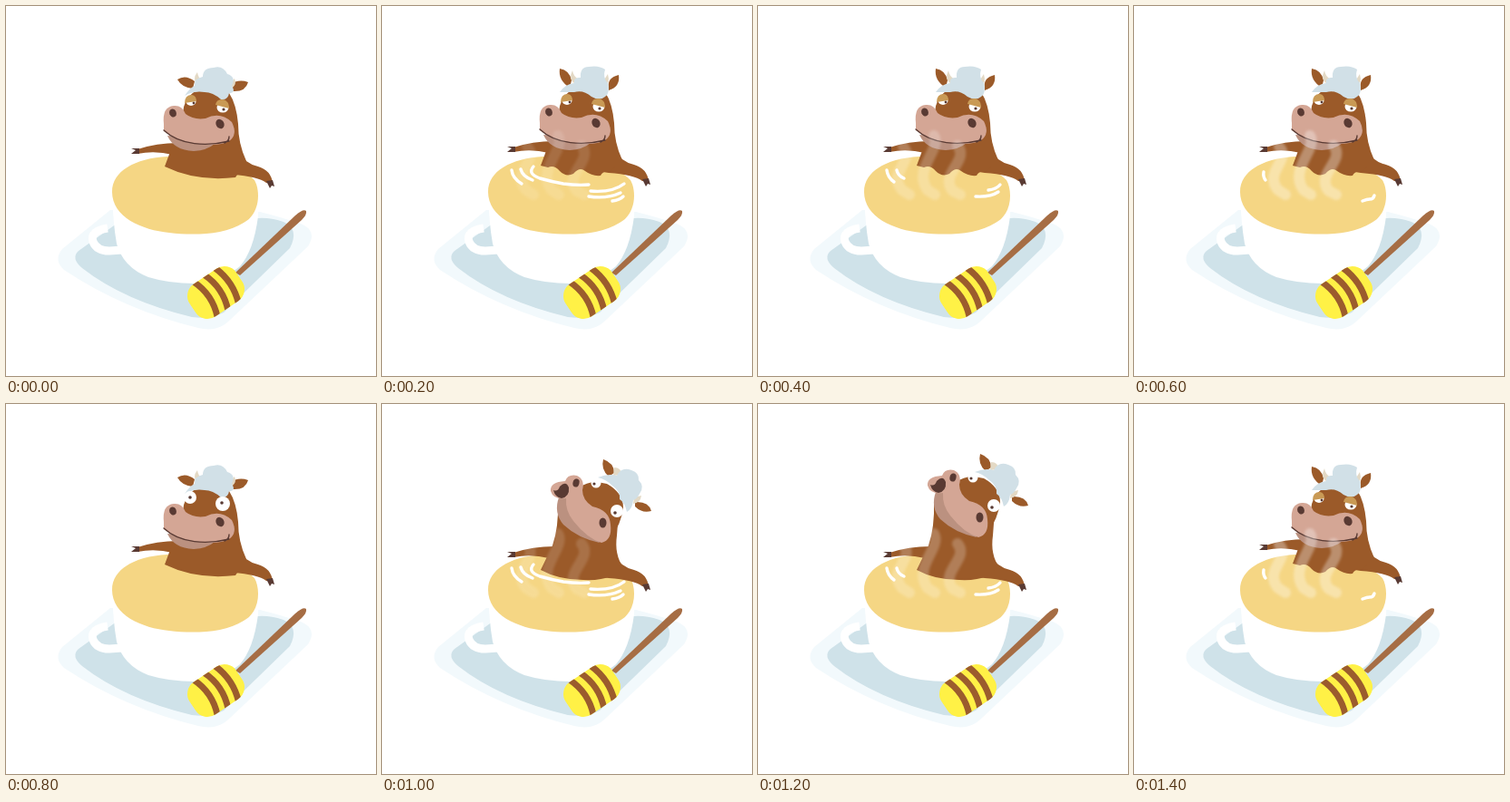
Recreate the animation shown at these times as an HTML page. Size 408 by 408 pixels, loop 1590 ms.

```html
<!DOCTYPE html>
<html lang="en">
<head>
<meta charset="utf-8">
<title>Cow in a cup</title>
<style>
html, body { margin: 0; width: 100%; height: 100%; overflow: hidden; background: #fff; }
svg { display: block; width: 100vw; height: 100vh; }
.brown { fill: #9b5a29; }
.dark { fill: #593a33; }
.pink { fill: #d4a695; }
.jaw { fill: #bb9180; }
.hair { fill: #d1e0e7; }
.horn { fill: #e3d9c5; }
.lid { fill: #c99a55; }
.white { fill: #fff; }
.line { fill: none; stroke: #593a33; stroke-width: 1.4; stroke-linecap: round; }
.ripple { fill: none; stroke: #fff; stroke-width: 3.4; stroke-linecap: round; }
.steam { fill: none; stroke: #fff; stroke-width: 12; stroke-linecap: round; }
</style>
</head>
<body>
<svg viewBox="0 0 408 408">
  <defs>
    <filter id="soft" x="-30%" y="-30%" width="160%" height="160%"><feGaussianBlur stdDeviation="1.8"/></filter>
    <clipPath id="honey"><rect x="-31" y="-21.5" width="62" height="43" rx="16"/></clipPath>
  </defs>

  <!-- saucer and cup -->
  <path fill="#f2f9fc" d="M115 225L62 268Q52 280 64 291Q130 335 212 355Q232 360 245 348L333 265Q344 248 325 240Q300 232 280 227Z"/>
  <path fill="#cfe2e9" d="M122 240L80 270Q71 278 84 289Q130 325 205 343Q225 346 240 338L313 267Q324 246 306 238Q290 233 278 234Z"/>
  <path class="white" d="M117 205Q118 240 122 262Q129 288 157 299Q180 306 208 306Q240 302 258 287Q273 270 278 232L279 205Z"/>
  <path fill="none" stroke="#fff" stroke-width="9" d="M112 245Q92 248 96 260Q100 270 114 270L128 269"/>
  <path fill="#f5d684" d="M117 205C117 182 142 168 178 166C225 168 262 178 274 192C281 204 280 230 262 239C240 253 205 253 180 250C150 247 117 233 117 205Z"/>

  <!-- honey dipper -->
  <path fill="#a66d44" d="M253 294L319 231Q328 223 331 226Q332 230 326 236L258 297Z"/>
  <g transform="translate(231.5 316) rotate(-34)" clip-path="url(#honey)">
    <rect x="-31" y="-22" width="62" height="44" fill="#fff146"/>
    <path fill="none" stroke="#9b5c2d" stroke-width="7" d="M-14-24Q-4 0-14 24M0-24Q10 0 0 24M14-24Q23 0 14 24"/>
  </g>

  <!-- ripples on the cream -->
  <g class="ripple">
    <path data-on="15" d="M143 181Q144 190 154 196M153 180Q155 188 166 192M167 177Q160 185 174 190Q188 194 200 196Q215 198 228 197M228 210Q248 213 263 206M230 204Q254 206 267 196M254 215Q262 214 266 210"/>
    <path data-on="26" d="M142 181Q143 189 150 194M153 181Q154 187 161 190M240 210Q256 211 265 205M254 203Q263 202 267 197"/>
    <path data-on="37" d="M143 183Q142 188 145 192M252 215Q257 213 260 213Q264 213 265 209"/>
  </g>

  <!-- arms -->
  <g id="arms">
    <path class="brown" d="M145 158Q166 151 190 151L255 160Q264 174 278 177Q292 181 294 195L287 195Q278 188 250 186L178 175L184 164Q164 159 145 163Z"/>
    <path class="dark" d="M147 157L138 157L143 159L138 163L147 163ZM287 193L294 192L296 199L293 198L291 201Z"/>
  </g>

  <!-- upright cow -->
  <g id="upright" data-on="012347">
    <path class="brown" data-on="04" d="M207 95Q228 90 246 96Q254 108 256 130Q256 152 265 171L253 189Q210 194 175 177L185 150L195 118Q196 103 207 95Z"/>
    <path class="brown" data-on="1237" d="M207 95Q228 90 246 96Q254 108 256 130Q256 152 265 171L251 184Q244 182 241 188Q232 189 224 183Q218 178 211 186Q203 190 196 183Q190 176 183 179L175 177L185 150L195 118Q196 103 207 95Z"/>
    <g data-on="04">
      <path class="brown" d="M189 81Q198 75 208 83L206 91Q194 90 189 81ZM247 87Q256 80 267 84Q264 95 250 94Z"/>
      <path class="horn" d="M211 73Q205 80 211 88L217 83Q212 80 211 73ZM252 80Q255 86 249 91L246 86Z"/>
      <path class="hair" d="M197 99Q202 91 208 88Q207 80 217 78Q217 68 229 68Q239 65 244 75Q254 78 249 88Q254 96 246 96Q245 104 237 103Q228 95 219 95Q207 93 197 99Z"/>
    </g>
    <g data-on="1237">
      <path class="brown" d="M196 70Q207 72 209 83L207 91Q194 83 196 70ZM250 91Q248 80 261 77Q263 90 250 94Z"/>
      <path class="horn" d="M210 72Q205 82 213 87L217 82Q211 79 210 72ZM249 76Q252 86 245 91L244 84Z"/>
      <path class="hair" d="M196 96Q202 87 212 86Q211 79 219 80Q218 68 228 68Q239 66 246 71Q243 80 249 86Q252 97 246 101Q240 106 231 101Q222 93 212 96Z"/>
    </g>
    <path class="jaw" d="M178 143Q185 159 207 160Q222 159 230 152L200 145Z"/>
    <path class="pink" d="M174 130Q172 111 185 110Q194 109 198 119Q207 126 220 124Q236 116 249 128Q256 142 246 149Q235 155 213 152Q190 150 174 138Z"/>
    <path class="line" d="M174 137C192 154 222 155 246 149M241 151Q246 149 246 144"/>
    <ellipse class="dark" cx="184" cy="118" rx="3.8" ry="4.6" transform="rotate(-20 184 118)"/>
    <ellipse class="dark" cx="236" cy="130" rx="4.4" ry="5.4" transform="rotate(-30 236 130)"/>
    <g data-on="01237">
      <ellipse class="white" cx="204" cy="105" rx="5.5" ry="5"/>
      <ellipse class="white" cx="239" cy="112" rx="6.5" ry="5.5"/>
      <circle class="dark" cx="207" cy="107" r="1.4"/>
      <circle class="dark" cx="240" cy="114" r="1.6"/>
      <path class="lid" d="M197 107Q197 98 205 98Q210 99 210 105ZM231 109Q232 102 240 103Q246 105 246 113Z"/>
    </g>
    <g data-on="4">
      <circle class="white" cx="203" cy="103" r="7"/>
      <circle class="white" cx="239" cy="110" r="8"/>
      <circle class="dark" cx="203" cy="103" r="1.8"/>
      <circle class="dark" cx="238" cy="109" r="1.8"/>
    </g>
  </g>

  <!-- cow with its head thrown back -->
  <g data-on="56">
    <path class="brown" d="M194 108Q195 135 188 156L175 183Q195 194 222 194Q240 195 253 190L266 180Q256 166 259 145L262 105Z"/>
    <g id="tilted">
      <path class="brown" d="M218 92Q229 83 248 88Q266 98 266 114Q264 132 252 148L235 140ZM244 61Q256 65 256 76L250 80Q241 72 244 61ZM279 108Q294 107 297 118Q287 121 279 113Z"/>
      <path class="jaw" d="M195 103Q189 120 200 133Q216 148 240 153L228 130L204 101Z"/>
      <path class="pink" d="M186 96Q185 86 202 85Q205 77 215 79Q224 83 221 95Q221 106 232 113Q251 117 252 133Q254 150 242 153Q226 148 211 129Q202 118 203 104Q189 106 186 96Z"/>
      <path class="dark" d="M189 95Q194 97 196 91Q203 84 206 92Q207 102 198 104Q191 103 189 95Z"/>
      <ellipse class="dark" cx="214" cy="87" rx="3.5" ry="4.6" transform="rotate(15 214 87)"/>
      <ellipse class="dark" cx="243.5" cy="131" rx="4" ry="5.5"/>
      <circle class="white" cx="236" cy="87" r="5.5"/>
      <circle class="white" cx="259" cy="118" r="7"/>
      <circle class="dark" cx="234" cy="88" r="1.6"/>
      <circle class="dark" cx="257" cy="120" r="1.8"/>
      <path class="horn" d="M256 70Q264 70 264 78L255 79ZM286 101Q285 109 277 110L278 103Z"/>
      <path class="hair" d="M238 81Q250 76 259 79Q264 69 275 73Q284 76 283 84Q290 91 284 99Q281 105 277 106Q276 116 270 119Q268 109 262 105Q263 96 254 90Q247 83 238 81Z"/>
    </g>
  </g>

  <g id="steam" class="steam" filter="url(#soft)">
    <path d="M160 155C174 170 142 183 159 203L167 208"/>
    <path d="M194 143C203 158 170 180 187 203L195 208"/>
    <path d="M220 154C234 170 199 186 215 204L223 208"/>
  </g>
</svg>
<script>
const LOOP = 1590, STEP = 200;
const get = id => document.getElementById(id);
const parts = document.querySelectorAll('[data-on]');
const steam = [0, .12, .22, .32, 0, .14, .22, .32];
const armLift = [0, -2, -2, -2, 0, 6, 6, -2];
const move = (id, x, y) => get(id).setAttribute('transform', `translate(${x} ${y})`);

function draw(now) {
  const step = Math.floor(now % LOOP / STEP);
  for (const part of parts)
    part.style.display = part.dataset.on.includes(step) ? '' : 'none';
  move('arms', 0, armLift[step]);
  move('upright', 0, step % 4 ? -1 : 0);
  move('tilted', step === 6 ? 1 : 0, step === 6 ? -6 : 0);
  get('steam').style.opacity = steam[step];
  requestAnimationFrame(draw);
}
draw(performance.now());
</script>
</body>
</html>
```
